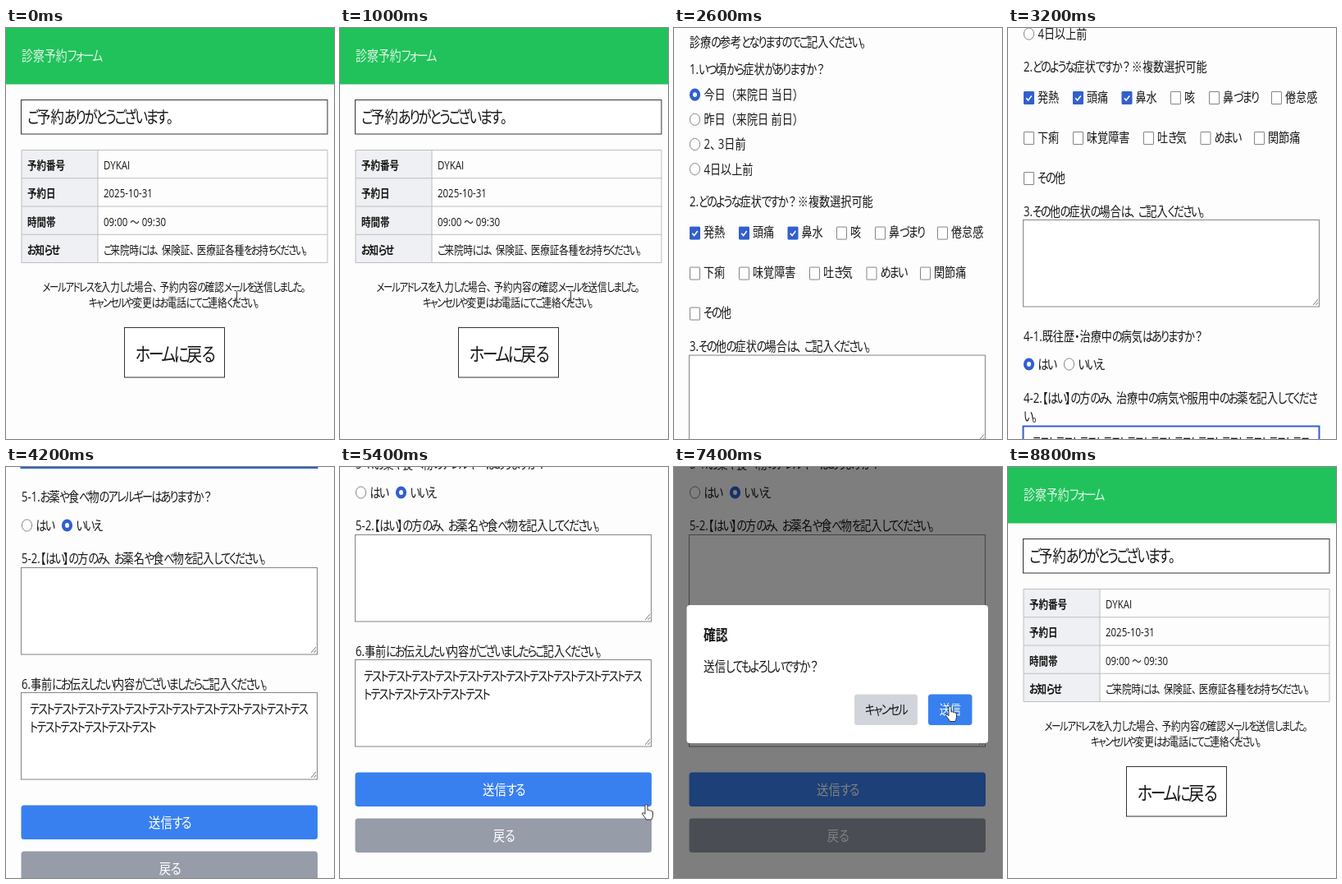
These frames come from a looping animation (400x500 px, 9000 ms). An HTML page:

```html
<!DOCTYPE html>
<html lang="ja">
<head>
<meta charset="utf-8">
<style>
  html, body { margin: 0; width: 100%; height: 100%; overflow: hidden; background: #fdfdfd; }
  svg { display: block; }
  text { font-family: "Open Sans", "Noto Sans CJK JP", sans-serif; font-feature-settings: "palt"; white-space: pre; }
  .hiragana { letter-spacing: -.145em; }
  .katakana { letter-spacing: -.125em; }
  .comma { letter-spacing: .25em; }
  .wide { font-feature-settings: normal; }
</style>
</head>
<body>
<svg id="stage" width="400" height="500" viewBox="0 0 400 500"></svg>
<script>
const LOOP = 9000, STEP = 200, SQUEEZE = .82;
const BLUE = '#3880f0', ACCENT = '#315fcf', INK = '#161616';
const RUNS = [['hiragana', /[ぁ-ゖ]+/g], ['katakana', /[ァ-ヺー]+/g], ['comma', /、/g], ['wide', /[（）？]+/g]];

// Text is placed by its vertical centre; each kind of character gets its own spacing.
function text(x, cy, str, size = 16, { fill = INK, weight = 400, anchor = 'start' } = {}) {
  const runs = RUNS.reduce((s, [name, chars]) =>
    s.replace(chars, run => `<tspan class="${name}">${run}</tspan>`), str);
  return `<text transform="translate(${x} ${cy + size * .37}) scale(${SQUEEZE} 1)" font-size="${size}"
    font-weight="${weight}" fill="${fill}" text-anchor="${anchor}">${runs}</text>`;
}

function rect(x1, y1, x2, y2, fill, stroke = 'none', r = 0, width = 1) {
  return `<rect x="${x1}" y="${y1}" width="${x2 - x1}" height="${y2 - y1}" rx="${r}"
    fill="${fill}" stroke="${stroke}" stroke-width="${width}"/>`;
}

const line = (d, stroke, width = 1) => `<path d="${d}" fill="none" stroke="${stroke}" stroke-width="${width}"/>`;

function button(x1, y1, x2, y2, label, fill, color = '#fff', size = 16) {
  return rect(x1, y1, x2, y2, fill, 'none', 3.5) +
    text((x1 + x2) / 2, (y1 + y2) / 2, label, size, { fill: color, anchor: 'middle' });
}

function radio(cx, cy, label, on) {
  const oval = (rx, ry, style) => `<ellipse cx="${cx}" cy="${cy}" rx="${rx}" ry="${ry}" ${style}/>`;
  return (on
    ? oval(6.6, 7.6, `fill="${ACCENT}"`) + oval(2.5, 2.9, 'fill="#fff"')
    : oval(6.1, 7.1, 'fill="#fff" stroke="#858585"')) + text(cx + 11, cy, label);
}

function checkbox(x, cy, label, on) {
  const box = rect(x + .5, cy - 6.5, x + 12.5, cy + 8.5, on ? ACCENT : '#fff', on ? ACCENT : '#858585', .5);
  const tick = on ? line(`M${x + 3.3} ${cy + 1.2}l2.3 2.8l4.2 -5.6`, '#fff', 1.6) : '';
  return box + tick + text(x + 17, cy, label);
}

function input(top, value) {
  return rect(18.5, top + .5, 379.5, top + 38.5, '#fff', '#8f8f8f') + text(23, top + 20.5, value);
}

function textarea(top, lines = [], focused = false) {
  return rect(18.5, top + .5, 379.5, top + 106, '#fff', focused ? ACCENT : '#858585', 0, focused ? 2 : 1) +
    line(`M372 ${top + 104}l6 -7M375.500 ${top + 104}l2.500 -3`, '#777') +
    lines.map((s, i) => text(29, top + 20.5 + i * 22, s)).join('');
}

function donePage() {
  const rows = [['予約番号', 'DYKAI'], ['予約日', '2025-10-31'], ['時間帯', '09:00 ～ 09:30'],
    ['お知らせ', 'ご来院時には、保険証、医療証各種をお持ちください。']];
  const edge = '#bcbec2', middle = { anchor: 'middle' };
  return rect(0, 0, 400, 500, '#fdfdfd') +
    rect(0, 0, 400, 68.5, '#21c25b') +
    text(19, 34, '診察予約フォーム', 17, { fill: '#dcf6e5' }) +
    rect(18.5, 87.5, 392, 129, '#fff', '#333') +
    text(26, 109, 'ご予約ありがとうございます。', 20) +
    rect(19, 149, 112, 286, '#eff0f3') +
    rows.map(([name, value], i) => {
      const cy = 167 + i * 34.2;
      return text(26, cy, name, 14, { weight: 700 }) + text(119, cy, value, 14) +
        line(`M19 ${148.5 + i * 34.25}H392`, edge);
    }).join('') +
    line('M19 148.500V285.500H392V148.500M112 148.500V285.500', edge) +
    text(205, 315, 'メールアドレスを入力した場合、予約内容の確認メールを送信しました。', 14, middle) +
    text(205, 334, 'キャンセルや変更はお電話にてご連絡ください。', 14, middle) +
    rect(144.5, 364.5, 266.5, 425, '#fff', '#333') +
    text(205.5, 396, 'ホームに戻る', 23, middle) +
    line('M278.500 319.500h2l1 1l1 -1h2M281.500 320v14M278.500 335h2l1 -1l1 1h2', '#333');
}

function formPage() {
  const mail = 'hanae@mihon.test';
  const typed = ['テスト'.repeat(11) + 'テス', 'ト' + 'テスト'.repeat(5)];
  const label = (cy, s, size) => text(19, cy, s, size);
  const checks = (cy, items) => items.map(([x, s, on]) => checkbox(x, cy, s, on)).join('');
  return label(2, 'メールアドレス【任意】') + input(12, mail) +
    label(65, '予約フォーム送信後、メールアドレスを入力された場合には確認メールをお送りしま', 14) +
    label(85, 'す。', 14) +
    label(106, '※予約をキャンセルされる場合は、お電話でのみ受け付けております。', 14) +
    label(138, 'メールアドレス（確認用）') + input(148, mail) +
    label(237, '診療の参考となりますのでご記入ください。') +
    label(270, '1.いつ頃から症状がありますか？') +
    ['今日（来院日 当日）', '昨日（来院日 前日）', '2、3日前', '4日以上前']
      .map((s, i) => radio(25.5, 300.5 + i * 30.2, s, i === 0)).join('') +
    label(431, '2.どのような症状ですか？※複数選択可能') +
    checks(468, [[19, '発熱', 1], [79, '頭痛', 1], [138.5, '鼻水', 1], [198, '咳'], [245, '鼻づまり'], [321, '倦怠感']]) +
    checks(517, [[19, '下痢'], [79, '味覚障害'], [165, '吐き気'], [234.5, 'めまい'], [300, '関節痛']]) +
    checks(566, [[19, 'その他']]) +
    label(607, '3.その他の症状の場合は、ご記入ください。') + textarea(617) +
    label(759, '4-1.既往歴・治療中の病気はありますか？') +
    radio(25.5, 793, 'はい', true) + radio(74.5, 793, 'いいえ') +
    label(834, '4-2.【はい】の方のみ、治療中の病気や服用中のお薬を記入してくださ') +
    label(856, 'い。') + textarea(868, typed, true) +
    label(1009, '5-1.お薬や食べ物のアレルギーはありますか？') +
    radio(25.5, 1044, 'はい') + radio(74.5, 1044, 'いいえ', true) +
    label(1084, '5-2.【はい】の方のみ、お薬名や食べ物を記入してください。') + textarea(1095) +
    label(1237, '6.事前にお伝えしたい内容がございましたらご記入ください。') + textarea(1247, typed) +
    button(18.5, 1384.5, 380, 1426, '送信する', BLUE, '#fff', 17.5) +
    button(18.5, 1440.5, 380, 1482, '戻る', '#969da9', '#fff', 17.5);
}

function dialog() {
  return '<rect width="400" height="500" opacity=".5"/>' +
    rect(15.5, 168, 383, 336, '#fff', 'none', 4) +
    text(36, 204, '確認', 18, { weight: 700 }) +
    text(36, 243, '送信してもよろしいですか？', 16.5) +
    button(220, 276.5, 297, 314, 'キャンセル', '#d1d5db', INK) +
    button(310, 276.5, 363.5, 314, '送信', BLUE);
}

const hand = `<path d="M-3 -8q1.500 -2 3 0v6q1.500 -1 2.500 .5q1.500 -.8 2.300 .7q1.500 -.5 1.700 1.300
  v4q-.5 3 -1.500 5h-6.500q-2 -3.500 -5 -7q0 -2 2 -1l1.500 1.300z" fill="#fff" stroke="#222" stroke-width=".9"/>`;

const stage = document.getElementById('stage');
stage.innerHTML = `<g id="form">${formPage()}</g><g id="dialog">${dialog()}</g>
  <g id="hand">${hand}</g><g id="done">${donePage()}</g>`;
const [form, modal, pointer, done] = stage.children;

// Linear interpolation through [time, value] pairs, held at both ends.
function track(t, keys) {
  const i = keys.findIndex(([time]) => t < time);
  if (i <= 0) return keys[i ? keys.length - 1 : 0][1];
  const [[t0, a], [t1, b]] = [keys[i - 1], keys[i]];
  return a + (b - a) * (t - t0) / (t1 - t0);
}

const show = (node, on) => node.setAttribute('display', on ? 'inline' : 'none');
const move = (node, x, y) => node.setAttribute('transform', `translate(${x} ${y})`);

function draw(now) {
  const t = Math.floor(now % LOOP / STEP) * STEP;
  show(done, t < 1200 || t >= 7800);
  show(modal, t >= 6200);
  show(pointer, t >= 5000);
  move(form, 0, -track(t, [[1200, -10], [1800, 0], [3200, 384], [4200, 973], [4800, 1013]]));
  move(pointer,
    track(t, [[5000, 386], [5800, 364], [6400, 364], [7200, 338]]),
    track(t, [[5000, 440], [5800, 399], [6400, 399], [7200, 300]]));
  requestAnimationFrame(draw);
}
draw(performance.now());
</script>
</body>
</html>
```
